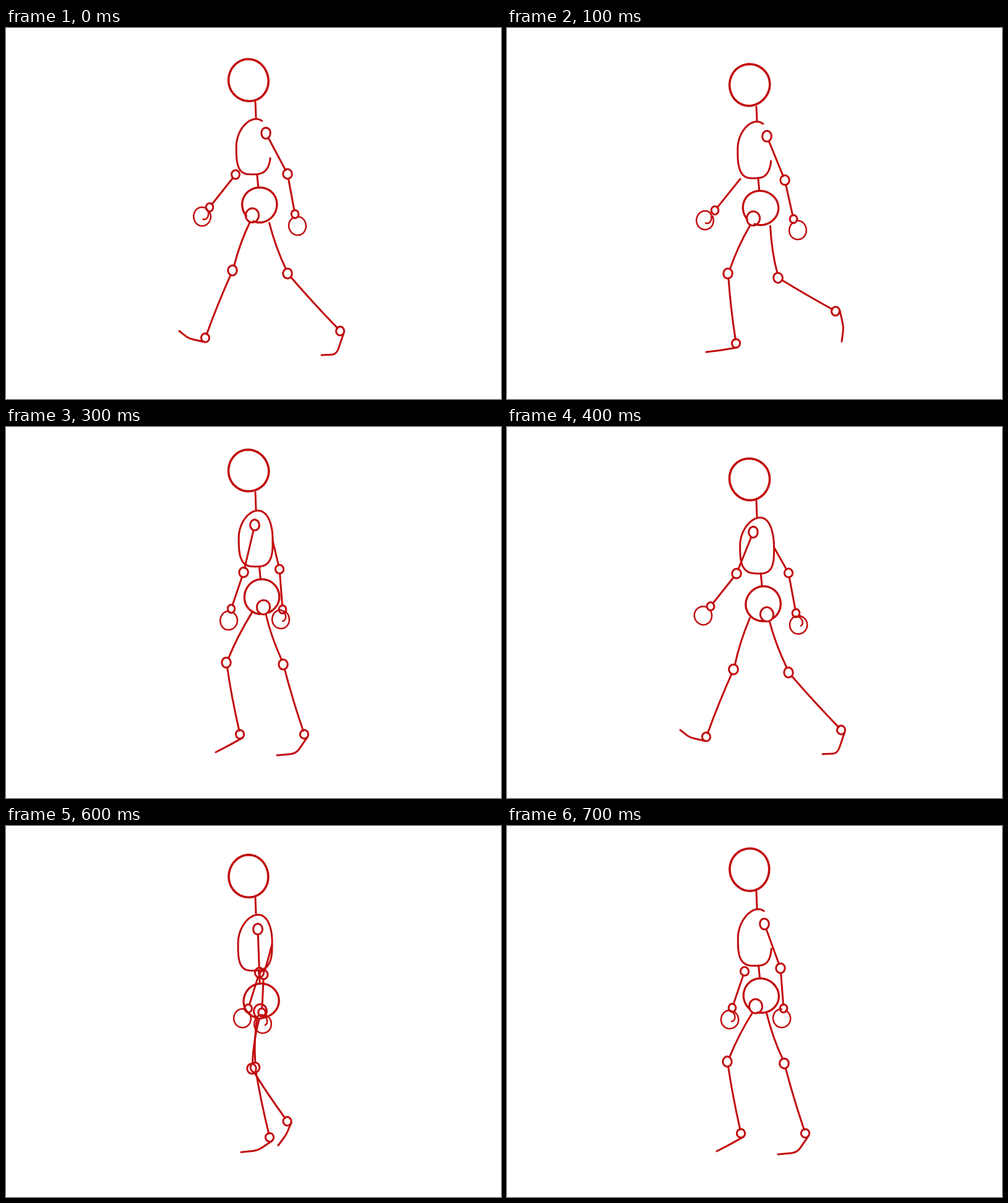
Write an HTML page that moves like this. It is 800 by 600 pixels and loops after 800 ms.

```html
<!DOCTYPE html>
<html lang="en">
<head>
<meta charset="utf-8">
<title>Walk cycle</title>
<style>
html, body { margin: 0; width: 100%; height: 100%; overflow: hidden; background: #fff; }
svg { display: block; width: 100vw; height: 100vh; }
path { fill: none; stroke: #c20b0d; stroke-linecap: round; stroke-linejoin: round; }
g { opacity: 0; }
</style>
</head>
<body>
<svg viewBox="0 0 800 600"></svg>
<script>
// Key points of one step. The stance limbs start on the planted foot's side,
// the swing limbs on the other; "turn" is the twist of the shoulders and hips.
// Arms: elbow, wrist, hand. Legs: knee, ankle, ball, toe.
const contact = {
  head: 84.5, chest: 192, turn: 11,
  stanceArm: [[455, 236], [467, 301], [471, 320]],
  swingArm: [[371, 237], [329, 290], [317, 305]],
  stanceLeg: [[366, 392], [322, 501], [295, 502], [280, 490]],
  swingLeg: [[455, 397], [540, 490], [534, 528], [510, 529]]
};
const down = {
  head: 92, chest: 197, turn: 11,
  stanceArm: [[449, 246], [463, 309], [470, 327]],
  swingArm: [[377, 244], [336, 295], [320, 311]],
  stanceLeg: [[357, 397], [370, 510], [346, 521], [322, 524]],
  swingLeg: [[438, 404], [531, 458], [544, 484], [541, 507]]
};
const up = {
  head: 70.5, chest: 180.5, turn: -7,
  stanceArm: [[384, 235], [364, 294], [360, 313]],
  swingArm: [[442, 230], [447, 295], [444, 311]],
  stanceLeg: [[448, 384], [482, 497], [469, 528], [438, 531]],
  swingLeg: [[356, 381], [378, 497], [362, 514], [339, 526]]
};

// Halfway between two values, lists or poses
function middle(a, b) {
  if (typeof a === 'number') return (a + b) / 2;
  if (Array.isArray(a)) return a.map((v, i) => middle(v, b[i]));
  return Object.fromEntries(Object.keys(a).map(k => [k, middle(a[k], b[k])]));
}

const STEP = 100;
const TURN = Math.PI * 2;
const stride = [contact, down, middle(down, up), up];
const count = stride.length * 2;
const svg = document.querySelector('svg');

let seed = 7;
const random = () => (seed = seed * 16807 % 2147483647) / 2147483647;

function add(parent, tag, attrs = {}) {
  const el = document.createElementNS('http://www.w3.org/2000/svg', tag);
  for (const key in attrs) el.setAttribute(key, attrs[key]);
  return parent.appendChild(el);
}

const stroke = (g, d, width = 3) => add(g, 'path', { d, 'stroke-width': width });

// Part of a round outline with a slight wobble; shape(angle, t) gives unit x, y
const round = (a) => [Math.cos(a), Math.sin(a)];
function loop(g, [cx, cy], rx, ry, { from = -1.1, sweep = TURN, shape = round, width } = {}) {
  const p = random() * TURN, q = random() * TURN, pts = [];
  for (let i = 0; i <= 40; i++) {
    const t = i / 40, a = from + sweep * t;
    const wobble = 1 + 0.012 * Math.sin(2 * a + p) + 0.008 * Math.sin(3 * a + q);
    const [x, y] = shape(a, t);
    pts.push((cx + rx * x * wobble).toFixed(1) + ' ' + (cy + ry * y * wobble).toFixed(1));
  }
  stroke(g, 'M' + pts.join('L'), width);
}

// Line between two joints, cut short at both ends, bowed sideways
function bone(g, [ax, ay], [bx, by], cutA, cutB, bow = 0) {
  const len = Math.hypot(bx - ax, by - ay);
  const at = s => [ax + (bx - ax) * s / len, ay + (by - ay) * s / len];
  const [mx, my] = at(len / 2);
  stroke(g, `M${at(cutA)}Q${mx + bow * 2} ${my} ${at(len - cutB)}`);
}

// Round top leaning forward, boxy bottom
function egg(a) {
  const [x, y] = round(a);
  if (y < 0) return [x + 0.18 * y * y, y];
  return [Math.sign(x) * Math.abs(x) ** 0.65, y ** 0.65];
}

// Fist that curls in to show the thumb
function curl(a, t) {
  const r = t < 0.72 ? 1 : 1 - (t - 0.72) * 2.5;
  return [Math.cos(a) * r, Math.sin(a) * r];
}

function drawHand(g, wrist, hand, isNear) {
  const from = Math.atan2(wrist[1] - hand[1], wrist[0] - hand[0]) + 0.3;
  const look = isNear ? { sweep: TURN - 0.5 } : { sweep: TURN + 1.8, shape: curl };
  loop(g, wrist, 5.8, 6.5);
  loop(g, hand, 14, 15, { from, width: 2.5, ...look });
}

function drawLeg(g, hip, cut, [knee, ankle, ball, toe]) {
  bone(g, hip, knee, cut, 8, -2);
  loop(g, knee, 7.2, 8);
  bone(g, knee, ankle, 8, 6, -1);
  loop(g, ankle, 6.5, 7);
  const dx = toe[0] - ankle[0], dy = toe[1] - ankle[1], len = Math.hypot(dx, dy);
  const heel = [ankle[0] + 7 * dy / len, ankle[1] - 7 * dx / len];
  const nearBall = end => end.map((v, i) => ball[i] + (v - ball[i]) * 0.3);
  stroke(g, `M${heel}L${nearBall(heel)}Q${ball} ${nearBall(toe)}L${toe}`);
}

function drawPose(g, pose, nearStance) {
  const twist = nearStance ? pose.turn : -pose.turn;
  const [near, far] = nearStance ? ['stance', 'swing'] : ['swing', 'stance'];
  const [nearArm, farArm] = [pose[near + 'Arm'], pose[far + 'Arm']];
  const chest = [402 - twist * 0.2, pose.chest], chestW = 27.5, chestH = 45.3;
  const pelvis = [412 - twist * 0.2, pose.chest + 94];
  const bottom = chest[1] + chestH;

  loop(g, [392, pose.head], 32.3, 34, { sweep: TURN + 0.15, width: 3.6 });
  stroke(g, `M403 ${pose.head + 35}L404 ${chest[1] - chestH - 2}`);
  const gap = twist > 0
    ? { from: 0.25, sweep: TURN - 1.45 }
    : { from: -1.4 };
  loop(g, chest, chestW, chestH, { shape: egg, ...gap });
  stroke(g, `M${pelvis[0] - 4} ${bottom}L${pelvis[0] - 2} ${pelvis[1] - 28}`);

  const hip = [409 - twist, pelvis[1] + 17];
  const hipAngle = Math.atan2(17, hip[0] - pelvis[0]);
  loop(g, pelvis, 28.5, 28, { from: hipAngle + 0.25, sweep: TURN - 0.5, width: 3.3 });
  loop(g, hip, 10.5, 11.5);

  const [farElbow, farWrist, farHand] = farArm;
  const hidden = farElbow[0] > chest[0] - chestW && farElbow[0] < chest[0] + chestW
    && farElbow[1] < bottom + 3;
  if (twist < 0) bone(g, [chest[0] + chestW, chest[1] + 3], farElbow, 0, 7);
  if (!hidden) loop(g, farElbow, 6.5, 7);
  bone(g, farElbow, farWrist, hidden ? 0 : 7, 6);
  drawHand(g, farWrist, farHand, false);
  drawLeg(g, [409 + twist * 1.5, pelvis[1] + 26 + twist * 0.3], 0, pose[far + 'Leg']);

  const shoulder = [409 + twist, chest[1] - 22];
  const [elbow, wrist, hand] = nearArm;
  loop(g, shoulder, 7.3, 8.7);
  bone(g, shoulder, elbow, 9, 7);
  loop(g, elbow, 7.2, 7.7);
  bone(g, elbow, wrist, 8, 6);
  drawHand(g, wrist, hand, true);
  drawLeg(g, hip, 13, pose[near + 'Leg']);
}

for (let i = 0; i < count; i++) {
  const g = add(svg, 'g');
  drawPose(g, stride[i % stride.length], i < stride.length);
  const end = 1 / count;
  const anim = g.animate([
    { opacity: 1, offset: 0 },
    { opacity: 1, offset: end },
    { opacity: 0, offset: end },
    { opacity: 0, offset: 1 }
  ], { duration: STEP * count, delay: (i - count) * STEP, iterations: Infinity });
  anim.startTime = 0;
}
</script>
</body>
</html>
```
